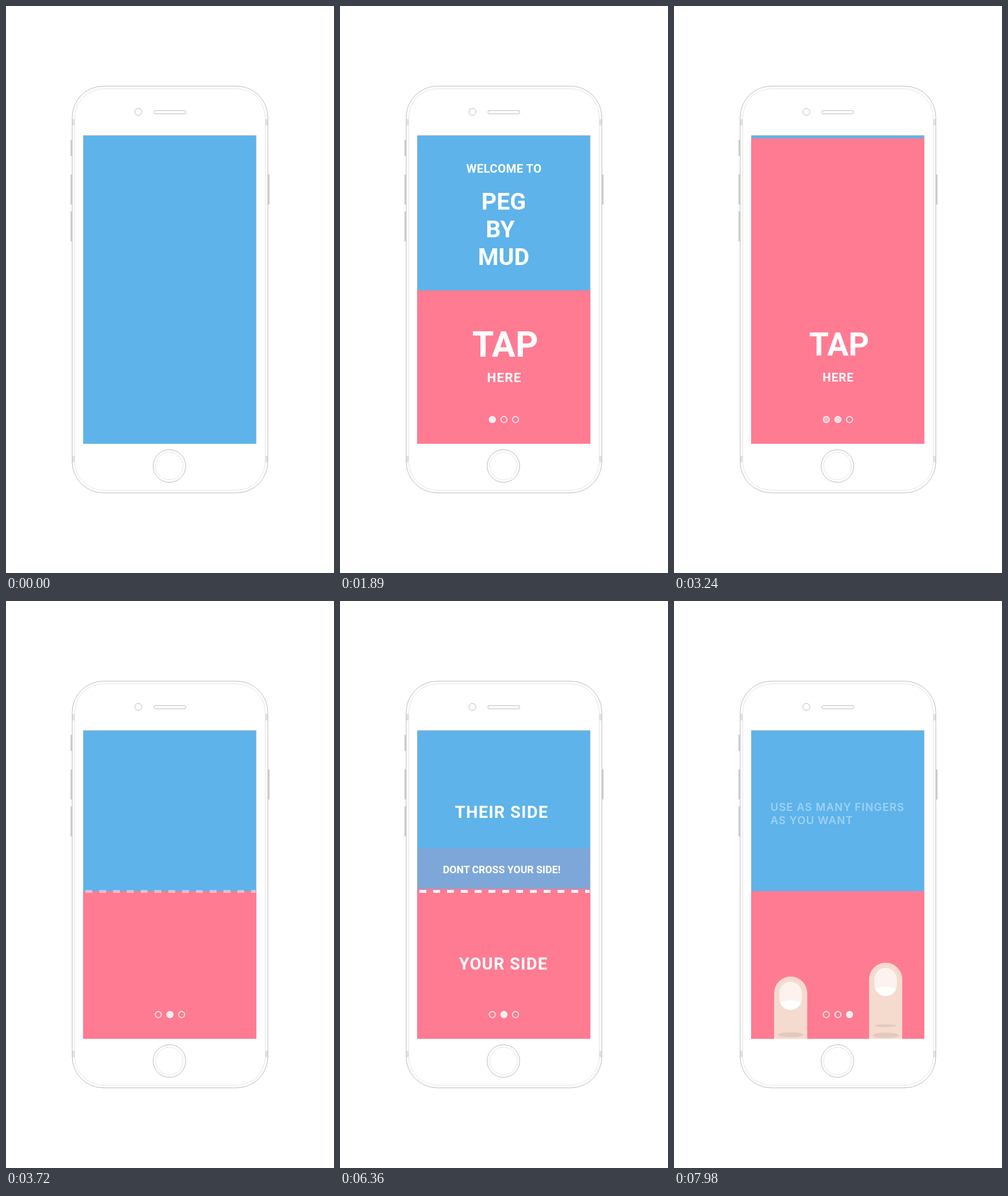
Write an HTML page that moves like this. It is 570x983 px and loops after 8000 ms.

```html
<!DOCTYPE html>
<html lang="en">
<head>
<meta charset="utf-8">
<title>Tap game intro</title>
<style>
  html, body { margin: 0; width: 100%; height: 100%; overflow: hidden; background: #fff; }
  svg { display: block; width: 570px; height: 983px; }
  text { font-family: Roboto, sans-serif; font-weight: 700; fill: #fff; }
  .mid text { text-anchor: middle; }
  .title { font-size: 41px; }
  .side { font-size: 29px; letter-spacing: 1.2px; }
  .hint { font: 600 18.6px Inter, sans-serif; letter-spacing: 1px; }
  .pulse { transform-box: fill-box; transform-origin: center; }
  .edge { fill: none; stroke: #b9b9b9; }
  .soft { fill: none; stroke: #e4e4e4; }
  .skin { fill: #f5dace; }
  .fold { fill: #e3c9bd; }
  .ring { fill: none; stroke: #f1f1f1; stroke-width: 1.7; }
  .dot { fill: #f1f1f1; }
</style>
</head>
<body>
<svg viewBox="0 0 570 983">
  <defs>
    <clipPath id="screen"><rect x="134.5" y="225" width="300" height="534"/></clipPath>
    <g id="finger">
      <rect class="skin" width="57.6" height="240" rx="28.8"/>
      <clipPath id="nail"><rect x="9.3" y="9" width="39" height="49" rx="19.5"/></clipPath>
      <g clip-path="url(#nail)">
        <rect x="9" y="9" width="40" height="49" fill="#fcf2ee"/>
        <ellipse cx="28.8" cy="55" rx="23" ry="14" fill="#fff"/>
      </g>
    </g>
  </defs>

  <g id="phone">
    <g fill="#cfcfcf">
      <rect x="112" y="232" width="3" height="28"/>
      <rect x="112" y="292" width="3" height="52"/>
      <rect x="112" y="356" width="3" height="52"/>
      <rect x="455" y="292" width="3" height="52"/>
    </g>
    <g fill="#e2e2e2">
      <rect x="115" y="196" width="4.5" height="11"/>
      <rect x="450.5" y="196" width="4.5" height="11"/>
      <rect x="115" y="780" width="4.5" height="11"/>
      <rect x="450.5" y="780" width="4.5" height="11"/>
    </g>
    <rect class="edge" x="115" y="139" width="340" height="705" rx="54"/>
    <rect class="soft" x="119.5" y="143.5" width="331" height="696" rx="50"/>
    <circle class="edge" cx="230" cy="183.5" r="6"/>
    <rect class="edge" x="257" y="181.3" width="55.5" height="5.6" rx="2.6"/>
    <circle class="edge" cx="284" cy="797.5" r="28.3"/>
    <circle class="soft" cx="284" cy="797.5" r="23.8"/>
    <rect class="edge" x="134.5" y="224.5" width="300.2" height="534"/>
  </g>

  <g clip-path="url(#screen)">
    <rect x="134" y="225" width="301" height="534" fill="#5db3ea"/>

    <g class="mid">
      <text id="welcome" x="285" y="289" font-size="20.5" letter-spacing=".3">WELCOME TO</text>
      <g id="title" class="title">
        <text x="284.5" y="353">PEG</text>
        <text x="278.5" y="401">BY</text>
        <text x="284.5" y="449">MUD</text>
      </g>
      <text id="theirs" class="side" x="281" y="376">THEIR SIDE</text>
      <g id="band">
        <rect x="134" y="428" width="301" height="76" fill="#ff7b92" fill-opacity=".2"/>
        <text x="281" y="472" font-size="17.7">DONT CROSS YOUR SIDE!</text>
      </g>
    </g>
    <g id="hint" class="hint" opacity=".4">
      <text class="hint" x="167.5" y="364">USE AS MANY FINGERS</text>
      <text class="hint" x="167.5" y="387">AS YOU WANT</text>
    </g>

    <rect id="pink" x="134" width="301" height="800" fill="#ff7b92"/>

    <path id="dash" d="M138 503.5H434" stroke="#f2f2f2" stroke-width="5" stroke-dasharray="12"/>

    <g class="mid">
      <g id="call">
        <text id="tap" class="pulse" x="287" y="606" font-size="55.5">TAP</text>
        <text id="here" class="pulse" x="285.5" y="651" font-size="20.3" letter-spacing="1.1">HERE</text>
      </g>
      <text id="yours" class="side" x="284" y="639">YOUR SIDE</text>
    </g>

    <g id="left">
      <use href="#finger" x="173.9" y="651"/>
      <ellipse class="fold" cx="202.8" cy="752" rx="22" ry="4.5"/>
    </g>
    <g id="right">
      <use href="#finger" x="339" y="627"/>
      <ellipse class="fold" cx="367.8" cy="736.3" rx="18.5" ry="2.4"/>
      <ellipse class="fold" cx="367.8" cy="753" rx="22.5" ry="4.8"/>
    </g>

    <g id="dots">
      <circle class="ring" cx="264.7" cy="717" r="5.3"/>
      <circle class="ring" cx="284.9" cy="717" r="5.3"/>
      <circle class="ring" cx="305.1" cy="717" r="5.3"/>
      <circle id="dot1" class="dot" cx="264.7" cy="717" r="6"/>
      <circle id="dot2" class="dot" cx="284.9" cy="717" r="6"/>
      <circle id="dot3" class="dot" cx="305.1" cy="717" r="6"/>
    </g>
  </g>
</svg>
<script>
const LOOP = 8000;
const OUT = 'cubic-bezier(.2,.7,.3,1)';
const INOUT = 'cubic-bezier(.65,0,.35,1)';
const PULL = 'cubic-bezier(.4,.05,.2,.9)';

// steps: [ms, value, easing towards the next step]
function run(id, prop, steps, css = v => v) {
  const all = [[0, steps[0][1]], ...steps, [LOOP, steps.at(-1)[1]]];
  const frames = all.map(([ms, v, easing = 'linear']) =>
    ({ offset: ms / LOOP, [prop]: css(v), easing }));
  document.getElementById(id).animate(frames, { duration: LOOP, iterations: Infinity });
}
const fade = (id, ...steps) => run(id, 'opacity', steps);
const slide = (id, ...steps) => run(id, 'transform', steps, y => `translateY(${y}px)`);
const scale = (id, ...steps) => run(id, 'transform', steps, s => `scale(${s})`);

// pink is pulled up over the screen, then snaps back to the middle line
const pull = (t, from) => [
  [t, from, PULL], [t + 540, 238], [t + 690, 229.5], [t + 712, 225, INOUT], [t + 910, 503]
];
slide('pink', [480, 759, OUT], [1080, 493], ...pull(2550, 493), ...pull(6330, 503));

// welcome page
slide('welcome', [720, -39, OUT], [1140, 0]);
fade('welcome', [720, 0], [960, 1], [3240, 1], [3240, 0]);
slide('title', [900, -40, OUT], [1410, 0]);
fade('title', [900, 0], [1200, 1], [3240, 1], [3240, 0]);
fade('call', [840, 0], [1140, 1], [3270, 1], [3480, 0]);
for (const id of ['tap', 'here']) {
  scale(id,
    [1635, 1, INOUT], [1885, 1.1, INOUT], [2085, 1],
    [2285, 1, INOUT], [2535, 1.1, INOUT], [2735, 1]);
}

// page dots
fade('dots', [780, 0], [1080, 1]);
fade('dot1', [3100, 1], [3380, 0]);
fade('dot2', [3020, 0], [3300, 1], [7080, 1], [7360, 0]);
fade('dot3', [7040, 0], [7320, 1]);

// two sides
fade('dash', [3540, 0], [3900, 1], [6880, 1], [7135, 0]);
fade('yours', [4260, 0], [4440, 1], [7040, 1], [7240, 0]);
fade('theirs', [4650, 0], [4800, 1], [7035, 1], [7035, 0]);
fade('band', [5160, 0], [5460, 1], [7035, 1], [7035, 0]);

// fingers
fade('hint', [7035, 0], [7035, .4]);
slide('left', [7290, 112, OUT], [7740, 0]);
slide('right', [7530, 136, OUT], [7980, 0]);
</script>
</body>
</html>
```
